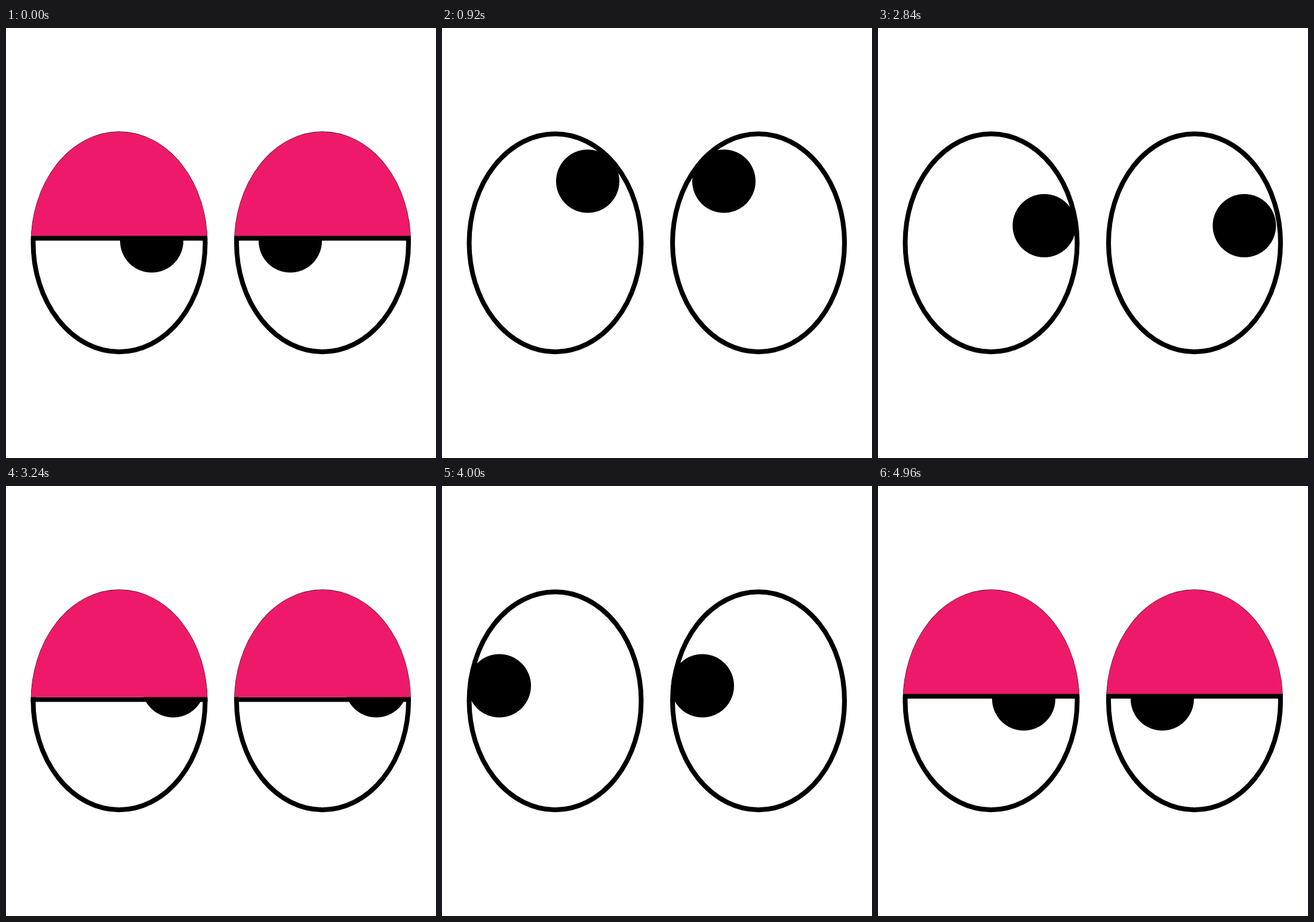
Write an HTML page with a canvas that moves like this. It is 720 px wide and 720 px high and loops after 6 s.

```html
<!DOCTYPE html>
<html lang="en">
<head>
<meta charset="utf-8">
<title>Eyes</title>
<style>
  html, body { margin: 0; width: 100%; height: 100%; overflow: hidden; background: #fff; }
  canvas { display: block; width: 720px; height: 720px; }
</style>
</head>
<body>
<canvas id="stage" width="720" height="720"></canvas>
<script>
const ctx = document.getElementById('stage').getContext('2d');
const LOOP = 6000, STEP = 40;
const OPEN = 165, HALF = 352, SHUT = 550;

const linear = v => v;
const cubic = v => v < 0.5 ? 4 * v ** 3 : 1 - 4 * (1 - v) ** 3;

// Each move: start ms, end ms, value to reach, easing
const lidMoves = [
  [0, 460, SHUT, cubic], [460, 920, OPEN, cubic],
  [2320, 2480, SHUT, linear], [2480, 2640, OPEN, linear],
  [3160, 3320, SHUT, linear], [3320, 3480, OPEN, linear],
  [4520, 4960, HALF, cubic]
];

// Each gaze: start ms, end ms, left pupil x, right pupil x, y
const gazes = [
  [180, 920, 244, 472, 256.5],
  [2300, 2995, 280, 620, 334.5],
  [3255, 4000, 96, 436, 334.5],
  [4520, 4960, 244, 476, 356.5]
];
const track = (i) => gazes.map(g => [g[0], g[1], g[i], cubic]);
const leftMoves = track(2), rightMoves = track(3), heightMoves = track(4);

function valueAt(t, value, moves) {
  for (const [start, end, to, ease] of moves) {
    if (t <= start) break;
    value += (to - value) * ease(Math.min(1, (t - start) / (end - start)));
  }
  return value;
}

function ellipse(x, y, rx, ry) {
  ctx.beginPath();
  ctx.ellipse(x, y, rx, ry, 0, 0, Math.PI * 2);
}

function eye(cx, pupilX, pupilY, lid) {
  const cy = 359.75;
  ctx.lineWidth = 8;
  ellipse(cx, cy, 144, 182.5);
  ctx.stroke();

  ctx.save();
  ellipse(cx, cy, 148, 186.5);
  ctx.clip();
  ctx.fillStyle = '#000';
  ellipse(pupilX, pupilY, 53, 53);
  ctx.fill();
  ctx.fillRect(cx - 150, lid - 4, 300, 8);
  // The lid stops just inside the outline, leaving a hairline edge
  ellipse(cx, cy, 147.6, 186.1);
  ctx.clip();
  ctx.fillStyle = '#ee1a69';
  ctx.fillRect(cx - 150, 0, 300, lid - 4);
  ctx.restore();
}

function draw(now) {
  const t = Math.floor(now / STEP) * STEP % LOOP;
  const lid = valueAt(t, HALF, lidMoves);
  const y = valueAt(t, 356.5, heightMoves);
  ctx.fillStyle = '#fff';
  ctx.fillRect(0, 0, 720, 720);
  eye(189.5, valueAt(t, 244, leftMoves), y, lid);
  eye(530, valueAt(t, 476, rightMoves), y, lid);
}

const begin = performance.now();
function tick() {
  draw(performance.now() - begin);
  requestAnimationFrame(tick);
}
tick();
</script>
</body>
</html>
```
